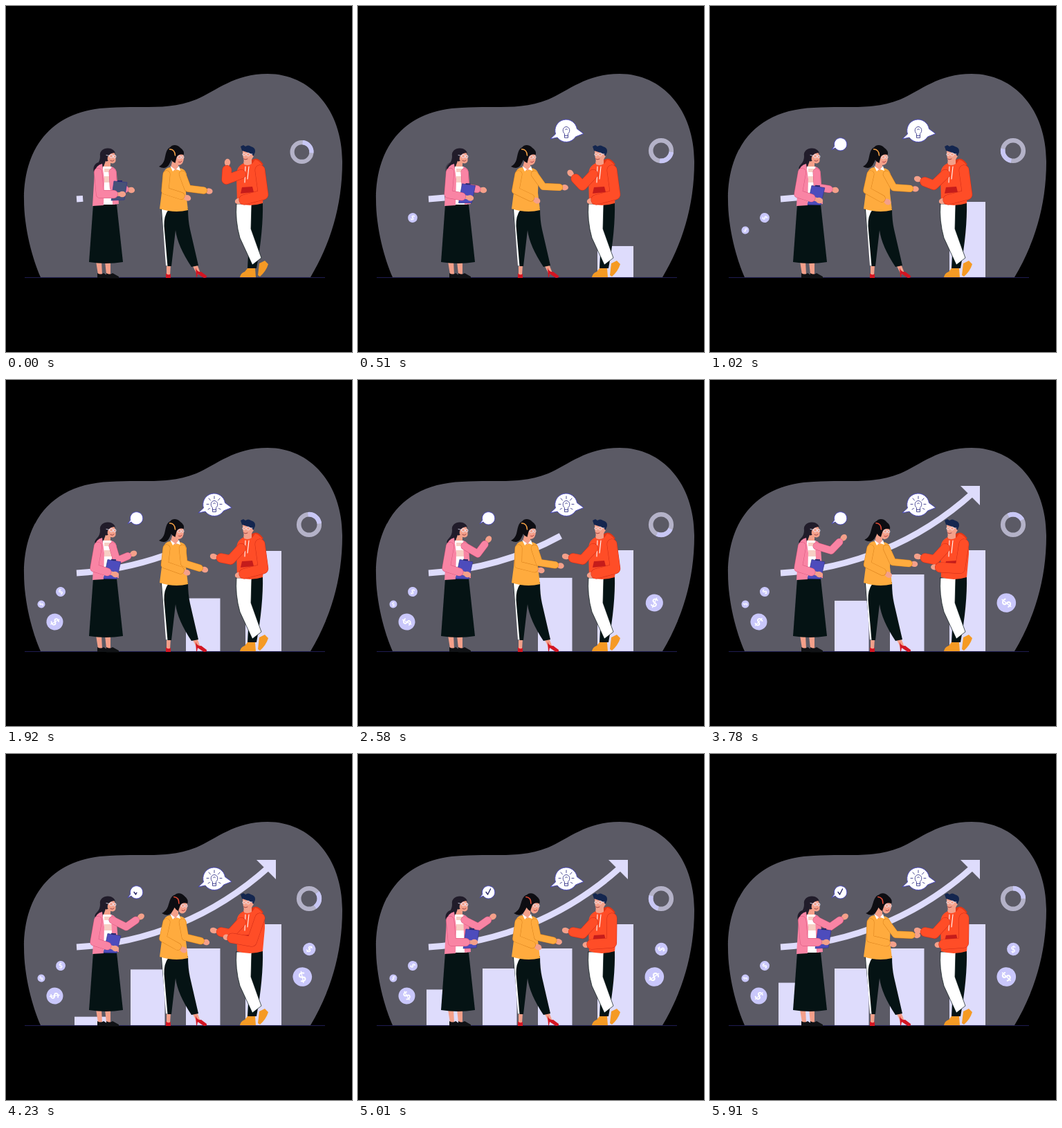
An HTML page that plays this animation: 500 px wide and 500 px high, repeating every 5.94 s.

```html
<!DOCTYPE html>
<html lang="en">
<head>
<meta charset="utf-8">
<title>Team growth</title>
<style>
html, body { margin: 0; width: 100%; height: 100%; overflow: hidden; background: #000; }
svg { display: block; width: 100%; height: 100%; }
.line { fill: none; stroke-linecap: round; stroke-linejoin: round; }
.skin { fill: #f4a08a; }
.dark { fill: #051314; }
</style>
</head>
<body>
<svg viewBox="0 0 500 500">
  <rect width="500" height="500" fill="#000"/>
  <path fill="#5b5a65" d="M50 392C38 365 26 320 26 280C26 200 70 150 150 147C200 144 235 151 275 135C305 122 330 98 378 98C440 98 486 150 486 225C486 290 468 345 440 392Z"/>
  <g id="ring" class="line" stroke-width="6.6">
    <circle r="14.8" stroke="#b4b2c8"/>
    <path id="ringArc" d="M10.500-10.500A14.800 14.800 0 0 1 10.500 10.500" stroke="#c8c7f5" stroke-linecap="butt"/>
  </g>
  <g id="bars" fill="#dedcfc"></g>
  <path id="curve" pathLength="1" fill="none" stroke="#dedcfc" stroke-width="9" d="M102 279C205 273 300 235 379 164"/>
  <path id="arrowhead" fill="#dedcfc" d="M362 153H390V181Z"/>
  <path d="M27 392.400H461" stroke="#211f55"/>
  <g id="coins"></g>

  <g id="bigBubble">
    <path fill="#fff" stroke="#4543c0" stroke-width=".9" d="M285.500 185L278 192L288 190A16 16 0 0 0 314.500 189L326 184.500L316.500 177.500A16 16 0 1 0 285.500 185Z"/>
    <g class="line" stroke="#3c3a8e" stroke-width=".9">
      <path d="M298.500 187V184.500C294.500 181.500 296 174.500 301 174.500S307.500 181.500 303.500 184.500V187ZM298.500 187V190.500H303.500V187M299.500 178.500Q301 176.500 302.500 178.500"/>
      <path id="rays" d="M301 168V171.500M293 171L295.500 174M309 171L306.500 174M290 179.500H293M309 179.500H312M292 187L294.500 185.500M310 187L307.500 185.500"/>
    </g>
  </g>
  <g id="smallBubble">
    <path fill="#fff" stroke="#4543c0" stroke-width=".9" d="M181 205L176 207.500L179.800 202.500A9.200 9.200 0 1 1 181 205Z"/>
    <path id="check" class="line" pathLength="1" stroke="#29276b" stroke-width="1.400" d="M185 199.500L187.500 203L191.500 195"/>
  </g>

  <!-- woman in pink -->
  <g>
    <path class="skin" d="M130 369H138L139 388H133ZM143 369H151L151 388H145Z"/>
    <path fill="#101215" d="M132 386Q137 389 141 386L149 391V393H132ZM145 386Q150 389 154 386L163 391V393.500H145Z"/>
    <path class="dark" d="M126 287H160L169 370Q145 374 120 370Z"/>
    <path fill="#211c2a" d="M136 217C134 206 149 202 156 209L158 215L148 220C147 234 139 241 131 236C126 236 129 231 132 228Q136 224 136 217Z"/>
    <path id="hairTail" fill="#211c2a" d="M133 226C125 229 125 239 129 244L139 234Z"/>
    <path class="skin" d="M144 224H151V235L146 238L141 232Z"/>
    <path fill="#fff" d="M140 232L153 232L157 287H140Z"/>
    <path fill="#f7cfc4" d="M142 235H152L153 240H142ZM142 246H153V255H142Z"/>
    <path fill="#f984a4" d="M139 228Q130 230 128 240L125 289L141 288L142 250ZM152 232Q160 234 160 243L163 286L154 287Z"/>
    <path class="skin" d="M145 212L156 211L158.500 217L158.500 224Q157 228.500 151 227Q145 224 145 212Z"/>
    <path fill="#211c2a" d="M141 222C138 207 153 203 158 212Q150 212 147 218L146 225Z"/>
    <g class="line" stroke-width=".8">
      <path stroke="#eef" d="M145 215.500L149.500 216.500M149.500 217a2.500 2.500 0 1 0 5 0a2.500 2.500 0 1 0 -5 0M155 217.500a2 2 0 1 0 4 0a2 2 0 1 0 -4 0"/>
      <path stroke="#852f3a" d="M151 223.500Q154 225.500 156 223"/>
    </g>
    <g id="pinkFar"></g>
    <g id="folder"><path d="M-8-14L11-12L7 13L-12 14Z" stroke="#33358b" stroke-width=".7"/><path d="M-3-14L4-14" stroke="#282a70" stroke-width="2"/></g>
    <g id="pinkNear"></g>
  </g>

  <!-- woman in orange -->
  <g>
    <path class="skin" d="M232 373H238L237 390H232ZM269 374L276 373L281 386L276 388Z"/>
    <path fill="#d31522" d="M231 386Q234 390 238 387L238 393H231ZM274 378Q276 385 282 384L290 390Q291 393 286 393L277 387L276 392H275Z"/>
    <path class="dark" d="M224 292H263Q263 310 266 323L278 375L268 377Q248 347 245 324L239 376L232 376Z"/>
    <path fill="#fff" d="M225 294H235Q228 303 228.500 318L233.500 376L231 375Z"/>
    <path class="skin" d="M241 222H249V235L245 239L238 233Z"/>
    <g id="orangeHead">
      <path fill="#0d0d12" d="M238 204C231 206 231 215 229 222Q227 229 221 232Q230 237 235 230Q240 222 241 213Z"/>
      <path class="skin" d="M242 213L255 211L257 218Q257 229 250 230Q243 229 242 213Z"/>
      <path fill="#0d0d12" d="M236 214C233 200 246 198 252 205Q258 209 257 215Q249 213 246.500 219L244.500 227Q237 224 236 214Z"/>
      <g class="line" stroke-width=".8">
        <path id="band" stroke-width="1.500" d="M236.500 207Q244 207 244.500 216"/>
        <path stroke="#e7e3ee" d="M248 218.500a2.400 2.400 0 1 0 4.800 0a2.400 2.400 0 1 0 -4.800 0M253.500 218.500a1.800 1.800 0 1 0 3.600 0a1.800 1.800 0 1 0 -3.600 0"/>
        <path stroke="#a22433" d="M249.500 225.500Q252 227 254 224.500"/>
      </g>
    </g>
    <path fill="#ffab3e" d="M237 233Q229 234 227 243L225 270L222 293Q244 300 263 295L260 270L261 243Q259 235 250 234L245 238Z"/>
    <path fill="#fff" d="M237 231L244 236L241 239ZM250 231L246 236L252 238Z"/>
    <g id="orangeFar"></g><g id="orangeNear"></g>
  </g>

  <!-- man in red -->
  <g>
    <path class="dark" d="M349 283H371Q372 325 362 379H349L352 322Z"/>
    <path fill="#f59a24" d="M349 379H360L361 392H338Q339 386 345 384ZM366 372L374 368L379 373Q376 383 367 391L364 389Z"/>
    <path class="line" style="fill:#fff" stroke="#051314" stroke-width=".7" d="M333 286H355L354 322L369 364L356 374L338 335Q331 310 333 286Z"/>
    <path fill="#e13718" d="M353 224Q363 215 372 229L360 235L346 232Z"/>
    <path class="skin" d="M344 220H355V231L348 234L343 230Z"/>
    <path fill="#ff4d27" d="M344 227Q333 231 333 245L334 285Q352 291 371 285L374 252Q375 226 360 222Q354 233 344 229Z"/>
    <path class="skin" d="M342 208H356V213Q360 216 356 220Q354 227 347 227Q342 225 342 208Z"/>
    <path fill="#14264f" d="M341 209L339 203L343 201L346 203Q350 200 354 203Q361 205 360 211L357.500 217L355 214Q348 211 341 209Z"/>
    <g class="line" stroke-width=".8">
      <path stroke="#f3e9f0" d="M342 214.500a2 2 0 1 0 4 0a2 2 0 1 0 -4 0M347.500 214.500a2.400 2.400 0 1 0 4.800 0a2.400 2.400 0 1 0 -4.800 0M352.500 214L356 214"/>
      <path stroke="#8c2e32" d="M343.500 221Q346 223 349 221"/>
      <path stroke="#fff" stroke-width="1.100" d="M346 232L345 255M351 232L349 250"/>
    </g>
    <path fill="#c51c1b" d="M341 262L356 261L358 269L339 271Z"/>
    <g id="redFar"></g><g id="redNear"></g>
  </g>
</svg>
<script>
const LOOP = 5940, NS = 'http://www.w3.org/2000/svg';
const $ = id => document.getElementById(id);
const set = (el, attrs) => { for (const k in attrs) el.setAttribute(k, attrs[k]); return el; };
const add = (parent, tag, attrs) => parent.appendChild(set(document.createElementNS(NS, tag), attrs));
const clamp = x => Math.max(0, Math.min(1, x));
const mix = (a, b, p) => a + (b - a) * p;
const easeOut = x => 1 - (1 - x) ** 3;
const progress = (t, start, length) => clamp((t - start) / length);
const step = (t, start, length) => { const x = progress(t, start, length); return x * x * (3 - 2 * x); };
const wave = (t, peak, period) => Math.cos((t - peak) * 2 * Math.PI / period);

// The clipboard is lowered early on and lifted again near the end.
const lowered = t => step(t, 0, 900) - step(t, 4230, 670);

const hands = {
  pinkFar(t) {
    const lift = step(t, 1100, 2170), settle = step(t, 3270, 960);
    return [181 + 10 * lift + 4 * settle, 266 - 47 * lift + 16 * settle];
  },
  pinkNear: t => [168 - 10 * lowered(t), 272 + 9 * lowered(t)],
  orangeFar: t => [293 + 6 * wave(t, 3270, 2640), 268 - 6 * wave(t, 3270, 2640)],
  orangeNear: t => [260.5 - 4 * wave(t, 1020, 3210), 279 + 4 * wave(t, 1020, 3210)],
  redFar: t => [320 - 20 * step(t, 0, 850), 226 + 24 * step(t, 0, 850) + 5 * step(t, 1020, 900)],
  redNear(t) {
    const reach = step(t, 3300, 800) - .65 * step(t, 4100, 800);
    return [336 - 18 * reach, 282 - 18 * reach];
  }
};

const PINK = ['#f984a4', '#d75379'], ORANGE = ['#ffab3e', '#d67c18'], RED = ['#ff4d27', '#cc2916'];

function makeArm(id, [color, dark], shoulder, upper, lower, side, width, cuff) {
  const g = set($(id), { class: 'line' });
  const hand = add(g, 'path', { stroke: '#f4a08a', 'stroke-width': 5.5 });
  const palm = add(g, 'ellipse', { rx: 5.2, ry: 4.2, class: 'skin' });
  const edge = add(g, 'path', { stroke: dark, 'stroke-width': width + .9 });
  const sleeve = add(g, 'path', { stroke: color, 'stroke-width': width });

  return t => {
    const [sx, sy] = shoulder, [hx, hy] = hands[id](t);
    // The elbow follows from the two bone lengths.
    const reach = Math.hypot(hx - sx, hy - sy), ux = (hx - sx) / reach, uy = (hy - sy) / reach;
    const along = (upper ** 2 - lower ** 2 + reach ** 2) / (2 * reach);
    const out = side * Math.sqrt(Math.max(0, upper ** 2 - along ** 2));
    const ex = sx + ux * along - uy * out, ey = sy + uy * along + ux * out;
    const wx = mix(ex, hx, cuff), wy = mix(ey, hy, cuff);
    const d = `M${sx} ${sy}L${ex} ${ey}L${wx} ${wy}`;
    set(edge, { d });
    set(sleeve, { d });
    set(hand, { d: `M${wx} ${wy}L${hx} ${hy}` });
    const angle = Math.atan2(hy - ey, hx - ex) * 180 / Math.PI;
    set(palm, { transform: `translate(${hx} ${hy}) rotate(${angle})` });
  };
}

const arms = [
  makeArm('pinkFar', PINK, [154, 240], 22, 26, 1, 10, .65),
  makeArm('pinkNear', PINK, [133, 240], 32, 32, 1, 11, .62),
  makeArm('orangeFar', ORANGE, [255, 243], 22, 31, 1, 9.5, .75),
  makeArm('orangeNear', ORANGE, [232, 243], 24, 34, 1, 10, .72),
  makeArm('redFar', RED, [340, 243], 23, 25, -1, 13, .56),
  makeArm('redNear', RED, [367, 237], 36, 37, -1, 14, .78)
];

// x, full height, start
const bars = [[346, 146, 275], [260, 111, 1265], [180, 82, 2720], [99, 61.5, 4084]]
  .map(([x, height, start]) => ({ height, start, el: add($('bars'), 'rect', { x, width: x > 300 ? 52 : 49.5 }) }));

const coins = [[79, 306, 7], [51, 324, 5.5], [70.5, 349.5, 12], [428.3, 322, 13.8], [438.3, 282, 9.2]]
  .map(([x, y, r], i) => {
    const el = add($('coins'), 'g', {});
    add(el, 'circle', { r, fill: '#c9c7fb' });
    add(el, 'text', { y: r * .47, fill: '#fff', 'text-anchor': 'middle', 'font-size': r * 1.36,
      'font-weight': 700, 'font-family': 'Lato, sans-serif' }).textContent = '$';
    return { x, y, el, start: 200 + 180 * i * (i + 1) };
  });

function pop(el, t, start, x, y) {
  const s = easeOut(progress(t, start, 350));
  set(el, { transform: `translate(${x} ${y}) scale(${s}) translate(${-x} ${-y})` });
}
const reveal = (el, p) => set(el, { 'stroke-dasharray': `${p} 2`, opacity: p > 0 ? 1 : 0 });

function render(t) {
  for (const b of bars) {
    const height = b.height * easeOut(progress(t, b.start, 2030));
    set(b.el, { y: 392 - height, height });
  }
  for (const c of coins) {
    const s = easeOut(progress(t, c.start, 400));
    set(c.el, { transform: `translate(${c.x} ${c.y}) rotate(${(t - c.start) * .087}) scale(${s})` });
  }
  const arrive = easeOut(progress(t, 0, 500));
  set($('ring'), { transform: `translate(${427.5 + 10.5 * arrive} ${211 - 2 * arrive}) scale(${mix(.94, 1, arrive)})` });
  set($('ringArc'), { transform: `rotate(${t * 1080 / LOOP - 40})` });

  reveal($('curve'), mix(.03, 1, progress(t, 0, 3400) ** 1.6));
  pop($('arrowhead'), t, 3380, 379, 164);
  pop($('bigBubble'), t, 220, 301, 181);
  pop($('smallBubble'), t, 620, 188, 199);
  set($('rays'), { opacity: progress(t, 1250, 300) });
  reveal($('check'), progress(t, 4000, 420));

  const low = lowered(t), nod = step(t, 3270, 960);
  set($('folder'), { transform: `translate(${164 - 10 * low} ${267 + 7 * low}) rotate(${4 * low})`,
    fill: t < 250 ? '#465278' : '#4d4cbc' });
  set($('hairTail'), { opacity: 1 - low });
  set($('orangeHead'), { transform: `translate(${4 * nod} 0) rotate(${5 * nod} 244 232)` });
  set($('band'), { stroke: nod < .4 ? '#f3a044' : '#e44b36' });
  arms.forEach(pose => pose(t));
}

const begin = performance.now();
function tick() {
  const t = (performance.now() - begin) % LOOP;
  render(Math.floor(t / 30) * 30);
  requestAnimationFrame(tick);
}
tick();
</script>
</body>
</html>
```
